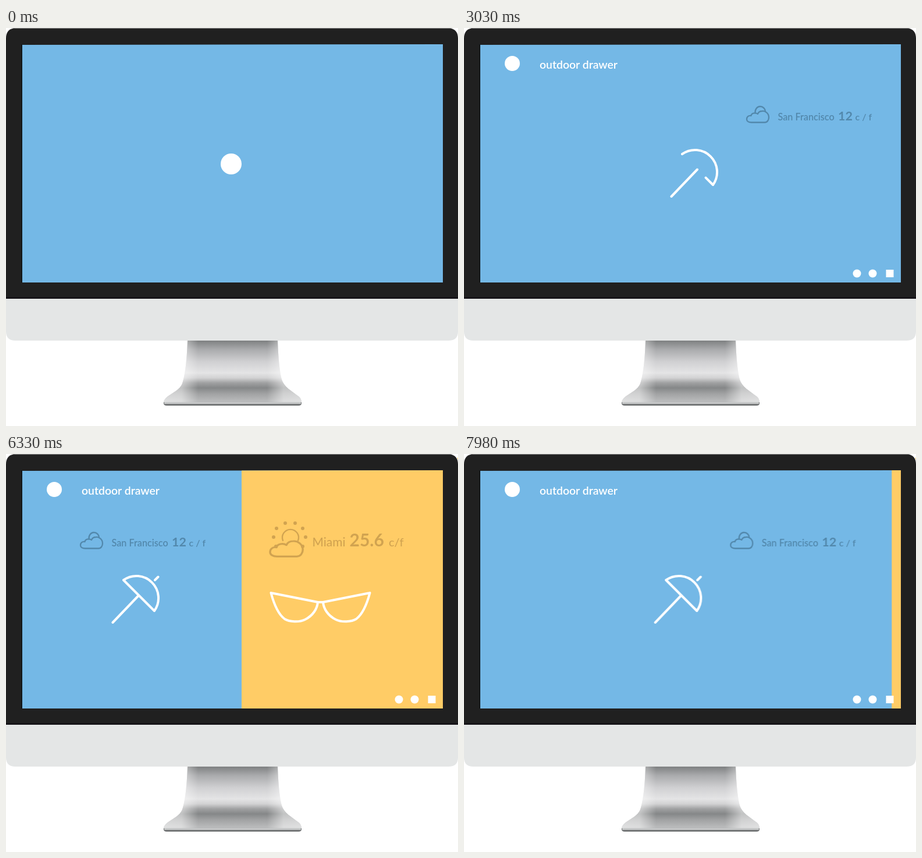
An HTML page for the animation above (8000 ms loop, 777x685 px).

```html
<!DOCTYPE html>
<html lang="en">
<head>
<meta charset="utf-8">
<title>Weather wardrobe on a desktop screen</title>
<style>
  html, body { margin: 0; width: 100%; height: 100%; overflow: hidden; background: #fff; }
  svg { display: block; width: 777px; height: 685px; }
  text { font-family: Lato, "Open Sans", sans-serif; font-weight: 600; }
  .bold { font-weight: 700; }
  .medium { font-weight: 500; }
  .line { fill: none; stroke: #fff; stroke-width: 4; stroke-linecap: round; stroke-linejoin: round; }
  .thin { fill: none; stroke-width: 2.3; stroke-linecap: round; stroke-linejoin: round; }
  .thin path { vector-effect: non-scaling-stroke; }
  .cool { fill: #5288ac; stroke: #5288ac; }
  .warm { fill: #d1a350; stroke: #d1a350; }
  .cool .thin, .warm .thin { fill: none; }
  .cool text, .warm text { stroke: none; }

  .logo, .slide, .counter, .place, .degrees, .sun, .miami, .glasses, .swing,
  .handle, .canopy, .tip, .social, .speck { animation: 8s linear infinite both; }

  .logo { animation-name: logo; }
  .slide { animation-name: slide; }
  .counter { animation-name: counter; }
  .place { animation-name: place; }
  .degrees { animation-name: degrees; }
  .sun { animation-name: sun; }
  .miami { animation-name: miami; }
  .swing { animation-name: swing; transform-origin: 540.5px 263px; }
  .speck { animation-name: speck; }
  .social { transform-box: fill-box; transform-origin: center; }
  .s1 { animation-name: pop1; }
  .s2 { animation-name: pop2; }
  .s3 { animation-name: pop3; }
  .handle, .canopy, .tip, .glasses { stroke-dasharray: 1.02 2; }
  .handle { animation-name: handle; }
  .canopy { animation-name: canopy; }
  .tip { animation-name: tip; }
  .glasses { animation-name: glasses; }

  @keyframes logo {
    0%, .3% { transform: translate(387px, 234px) scale(18); animation-timing-function: ease-in-out; }
    10.1%, 10.4% { transform: translate(387px, 234px) scale(21); animation-timing-function: cubic-bezier(.645, .045, .355, 1); }
    20.3%, 100% { transform: translate(83px, 61px) scale(13); }
  }

  /* Cubic in-out, split into exact halves; the last half is cut by the loop. */
  @keyframes slide {
    0% { transform: translateX(358px); }
    53.35% { transform: translateX(358px); animation-timing-function: cubic-bezier(.333, 0, .667, 0); }
    62.1% { transform: translateX(179px); animation-timing-function: cubic-bezier(.333, 1, .667, 1); }
    70.85% { transform: none; }
    86.96% { transform: none; animation-timing-function: cubic-bezier(.333, 0, .667, 0); }
    95.71% { transform: translateX(179px); animation-timing-function: cubic-bezier(.333, .565, .667, .853); }
    100% { transform: translateX(334.3px); }
  }
  @keyframes counter {
    0% { transform: translateX(-185px); }
    58.88% { transform: translateX(-185px); animation-timing-function: cubic-bezier(.333, 0, .667, 0); }
    64.69% { transform: translateX(-92.5px); animation-timing-function: cubic-bezier(.333, 1, .667, 1); }
    70.5% { transform: none; }
    87.5% { transform: none; animation-timing-function: cubic-bezier(.333, 0, .667, 0); }
    92.63% { transform: translateX(-92.5px); animation-timing-function: cubic-bezier(.333, 1, .667, 1); }
    97.75%, 100% { transform: translateX(-185px); }
  }

  @keyframes place { 0%, 20.5% { opacity: 0; } 22.6%, 100% { opacity: 1; } }
  @keyframes degrees { 0%, 23% { opacity: 0; } 25.5%, 100% { opacity: 1; } }
  @keyframes sun { 0%, 66.3% { opacity: 0; } 69%, 100% { opacity: 1; } }
  @keyframes miami { 0%, 68.5% { opacity: 0; } 72%, 100% { opacity: 1; } }
  @keyframes speck { 0%, 53.5% { opacity: 0; } 53.6%, 100% { opacity: 1; } }

  @keyframes pop1 { 0%, 25.5% { transform: scale(0); } 27.3% { transform: scale(1.25); } 28.6%, 100% { transform: none; } }
  @keyframes pop2 { 0%, 26.4% { transform: scale(0); } 28.2% { transform: scale(1.25); } 29.5%, 100% { transform: none; } }
  @keyframes pop3 { 0%, 27.3% { transform: scale(0); } 29.1% { transform: scale(1.25); } 30.4%, 100% { transform: none; } }

  @keyframes handle {
    0%, 30.6% { stroke-dashoffset: 1.02; opacity: 0; }
    30.7% { stroke-dashoffset: 1.02; opacity: 1; }
    34.5%, 100% { stroke-dashoffset: 0; opacity: 1; }
  }
  @keyframes canopy {
    0%, 33.9% { stroke-dashoffset: 1.02; opacity: 0; }
    34% { stroke-dashoffset: 1.02; opacity: 1; }
    39.8%, 100% { stroke-dashoffset: 0; opacity: 1; }
  }
  @keyframes tip {
    0%, 39.7% { stroke-dashoffset: 1.02; opacity: 0; }
    39.8% { stroke-dashoffset: 1.02; opacity: 1; }
    40.8%, 100% { stroke-dashoffset: 0; opacity: 1; }
  }
  @keyframes glasses {
    0%, 74.9% { stroke-dashoffset: 1.02; opacity: 0; }
    75% { stroke-dashoffset: 1.02; opacity: 1; }
    79%, 100% { stroke-dashoffset: 0; opacity: 1; }
  }
  @keyframes swing {
    0%, 80.25% { transform: none; animation-timing-function: ease-out; }
    81.3% { transform: rotate(17deg); animation-timing-function: ease-in-out; }
    82.7% { transform: rotate(-17deg); animation-timing-function: ease-in-out; }
    84%, 100% { transform: none; }
  }
</style>
</head>
<body>
<svg viewBox="0 0 777 685" width="777" height="685">
  <defs>
    <linearGradient id="metal" x1="0" y1="538" x2="0" y2="645" gradientUnits="userSpaceOnUse">
      <stop offset="0" stop-color="#7e8081"/>
      <stop offset=".14" stop-color="#a9aaac"/>
      <stop offset=".34" stop-color="#d0d0d2"/>
      <stop offset=".52" stop-color="#e4e4e5"/>
      <stop offset=".6" stop-color="#d2d2d3"/>
      <stop offset=".68" stop-color="#a0a1a2"/>
      <stop offset=".76" stop-color="#858788"/>
      <stop offset=".86" stop-color="#a2a3a4"/>
      <stop offset="1" stop-color="#bfc0c1"/>
    </linearGradient>
    <linearGradient id="shine" x1="271" y1="0" x2="508" y2="0" gradientUnits="userSpaceOnUse">
      <stop offset="0" stop-color="#fff" stop-opacity=".55"/>
      <stop offset=".13" stop-color="#fff" stop-opacity=".5"/>
      <stop offset=".25" stop-color="#fff" stop-opacity="0"/>
      <stop offset=".75" stop-color="#fff" stop-opacity="0"/>
      <stop offset=".87" stop-color="#fff" stop-opacity=".5"/>
      <stop offset="1" stop-color="#fff" stop-opacity=".55"/>
    </linearGradient>
    <clipPath id="screen"><path d="M28 29L751 28V438H28Z"/></clipPath>
    <path id="stand" d="M312 538H467C468 565 470 590 474 605 478 618 490 624 503 634 507 637 508 641 508 645H271C271 641 274 637 278 634 288 627 299 622 303 612 308 598 311 570 312 538Z"/>
    <path id="cloud" d="M9 19.500H32C36.500 19.500 39 15 39 11 39 4 33-.5 28 0 24 0 21 2 20 5 16 2 9 3.500 8.500 8 4 7 1 10 1 14 1 17.500 4.500 19.500 9 19.500Z"/>
  </defs>

  <!-- Monitor -->
  <use href="#stand" fill="url(#metal)"/>
  <use href="#stand" fill="url(#shine)"/>
  <path d="M271 644H508V647Q507 650 503 650H276Q272 650 271 647Z" fill="#77797a"/>
  <path d="M272 645.500H507" stroke="#e6e7e7" stroke-width="2"/>
  <path d="M0 466H777V522Q777 538 761 538H16Q0 538 0 522Z" fill="#e4e6e6"/>
  <path d="M0 466V18Q0 0 18 0H759Q777 0 777 18V466Z" fill="#202020"/>
  <path d="M14 .5H763" stroke="#8a8a8a"/>
  <path d="M0 464.500H777" stroke="#161418" stroke-width="3"/>
  <path d="M27 28V438" stroke="#12181c" stroke-width="2"/>
  <rect class="speck" x="776" y="6" width="1" height="3" fill="#fc6"/>

  <g clip-path="url(#screen)">
    <rect x="28" y="28" width="723" height="410" fill="#74b8e6"/>

    <g class="slide">
      <rect x="405" y="28" width="400" height="410" fill="#fc6"/>

      <g class="place cool">
        <g class="thin">
          <use href="#cloud" x="127" y="143"/>
          <path d="M142.500 146.500C142 140 146 135 151 135 156 135 160 139 160 144"/>
        </g>
        <text x="181.500" y="158.700" font-size="16.200">San Francisco</text>
        <g class="degrees">
          <text class="bold" x="285" y="158.700" font-size="21.500">12</text>
          <text x="314.500" y="158.700" font-size="16">c / f</text>
        </g>
      </g>

      <g class="counter line">
        <path class="handle" pathLength="1" d="M183.500 290L228 243.500"/>
        <path class="canopy" pathLength="1" d="M202 217A38 38 0 0 1 255 270Z"/>
        <path class="tip" pathLength="1" d="M256 217L261.500 211.500"/>
      </g>

      <g class="warm">
        <g class="sun">
          <g class="thin">
            <use href="#cloud" transform="translate(452.500 150) scale(1.48 1.35)"/>
            <path d="M476 149A14 14 0 1 1 502 149"/>
          </g>
          <g stroke="none">
            <circle cx="480" cy="119" r="3"/><circle cx="497" cy="119" r="3"/>
            <circle cx="465" cy="128" r="3"/><circle cx="510" cy="128" r="3"/>
            <circle cx="460" cy="143" r="3"/><circle cx="515" cy="143" r="3"/>
            <circle cx="464" cy="159" r="3"/><circle cx="510" cy="159" r="3"/>
          </g>
        </g>
        <g class="miami">
          <text class="medium" x="526.500" y="159" font-size="20.800">Miami</text>
          <text class="bold" x="590.500" y="159" font-size="30">25.6</text>
          <text class="medium" x="658" y="159" font-size="20">c/f</text>
        </g>
      </g>

      <g class="swing line">
        <path class="glasses" pathLength="1" d="M455.500 239C460 256 467 275 479 284 487 289 504 290 514 285 528 278 535 266 536 255Z"/>
        <path class="glasses" pathLength="1" d="M536 255H545"/>
        <path class="glasses" pathLength="1" d="M625.500 239C621 256 614 275 602 284 594 289 577 290 567 285 553 278 546 266 545 255Z"/>
      </g>
    </g>

    <g fill="#fff">
      <circle class="logo" r="1"/>
      <text id="title" x="130" y="69.500" font-size="19.400"></text>
      <circle class="social s1" cx="675.500" cy="422.500" r="7"/>
      <circle class="social s2" cx="702.500" cy="422.500" r="7"/>
      <rect class="social s3" x="725.500" y="416" width="13" height="13"/>
    </g>
  </g>
</svg>
<script>
  const NAME = "outdoor drawer";
  const TYPE_START = 1440, PER_LETTER = 30, LOOP = 8000;
  const title = document.getElementById("title");
  const clock = document.querySelector(".logo").getAnimations()[0];

  function type() {
    const time = (clock.currentTime || 0) % LOOP;
    const count = Math.max(0, Math.floor((time - TYPE_START) / PER_LETTER));
    const shown = NAME.slice(0, count);
    if (title.textContent !== shown) title.textContent = shown;
    requestAnimationFrame(type);
  }
  type();
</script>
</body>
</html>
```
